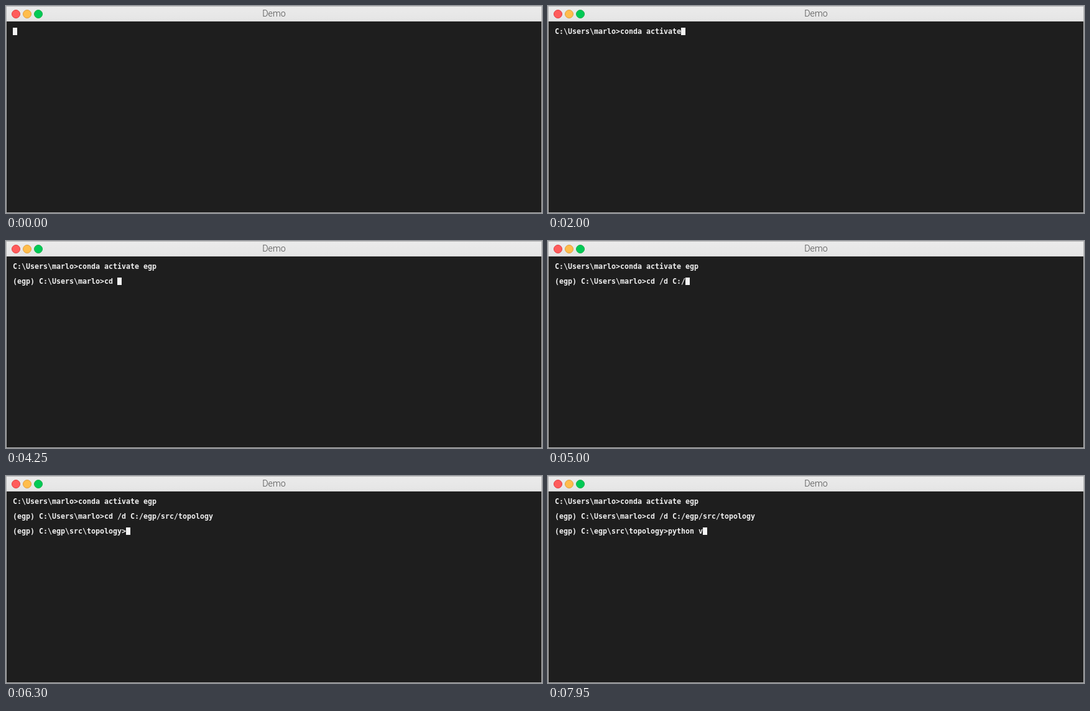
An HTML page that plays this animation: 862x334 px, repeating every 8000 ms.

```html
<!DOCTYPE html>
<html lang="en">
<head>
<meta charset="utf-8">
<title>Demo</title>
<style>
  html, body { margin: 0; width: 100%; height: 100%; overflow: hidden; background: #1e1e1e; }
  .window { position: relative; box-sizing: border-box; width: 862px; height: 334px; border: 1px solid #b3b3b3; background: #1e1e1e; }
  .bar { position: relative; box-sizing: border-box; height: 24px; border-bottom: 1px solid #d0d0d0;
         background: linear-gradient(#ebebeb, #e5e5e5); color: #4d4d4d;
         font: 300 14.4px/24px Roboto, sans-serif; text-align: center; }
  .bar i { position: absolute; top: 5px; box-sizing: border-box; width: 14px; height: 14px; border-radius: 50%; border: 1px solid; }
  .red { left: 8px; background: #ff5c5c; border-color: #e33e41 !important; }
  .yellow { left: 26px; background: #ffbd4c; border-color: #e09e3e !important; }
  .green { left: 44px; background: #00ca56; border-color: #14ae46 !important; }
  pre { position: absolute; left: 10px; top: 34px; margin: 0; color: #f0f0f0;
        font: bold 11.63px/12px "DejaVu Sans Mono", monospace; }
  #cursor { position: absolute; width: 7px; height: 12px; background: #f4f4f4; }
</style>
</head>
<body>
<div class="window">
  <div class="bar"><i class="red"></i><i class="yellow"></i><i class="green"></i>Demo</div>
  <pre id="screen"></pre>
  <div id="cursor"></div>
</div>
<script>
const LOOP = 8000, KEY = 50, CELL = 7, ROW = 12;
const events = [];
const put = (time, text) => events.push({ time, text });
const type = (time, text) => [...text].forEach((c, i) => put(time + i * KEY, c));

put(50, 'C:\\Users\\marlo>');
type(1050, 'conda');
type(1450, ' ');
type(1650, 'activate');
type(2200, ' ');
type(2400, 'egp');
put(2500, '\n');
put(3000, '\n(egp) C:\\Users\\marlo>');
type(4000, 'cd');
type(4250, ' ');
type(4450, '/d');
type(4700, ' ');
type(4900, 'C:/egp/src/topology');
put(5800, '\n');
put(6300, '\n(egp) C:\\egp\\src\\topology>');
type(7300, 'python');
type(7750, ' ');
type(7950, 'v');

const screen = document.getElementById('screen');
const cursor = document.getElementById('cursor');
let shown = null;

function draw(time) {
  const text = events.filter(e => e.time <= time).map(e => e.text).join('');
  if (text === shown) return;
  shown = text;
  screen.textContent = text;
  const lines = text.split('\n');
  cursor.style.left = 10 + lines.at(-1).length * CELL + 'px';
  cursor.style.top = 34 + (lines.length - 1) * ROW + 'px';
}

const start = performance.now();
function tick() {
  draw((performance.now() - start) % LOOP);
  requestAnimationFrame(tick);
}
tick();
</script>
</body>
</html>
```
